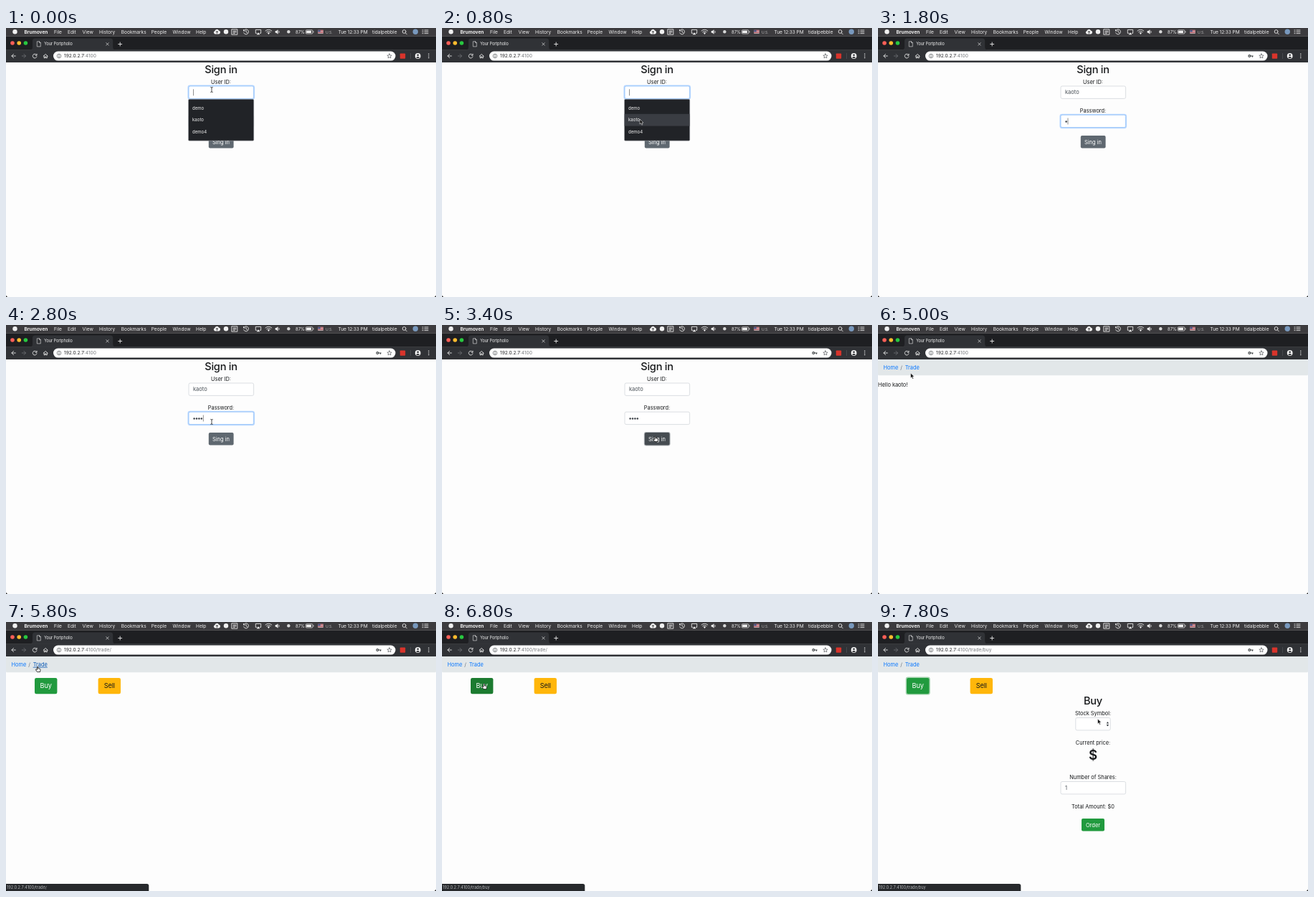
Write an HTML page that moves like this. It is 600x375 px and loops after 8000 ms.

```html
<!DOCTYPE html>
<html lang="en">
<head>
<meta charset="utf-8">
<title>Sign in and trade</title>
<style>
  html, body { margin: 0; width: 100%; height: 100%; overflow: hidden; background: #fdfdfd; }
  svg { display: block; width: 100%; height: 100%; }
  text { font-family: Inter, Roboto, sans-serif; white-space: pre; }
  .line { fill: none; stroke: #e8e8e8; stroke-width: .9; stroke-linecap: round; stroke-linejoin: round; }
</style>
</head>
<body>
<svg id="stage" viewBox="0 0 600 375"></svg>
<script>
const LOOP = 8000, STEP = 200;
const HOST = '192.0.2.7', PORT = ':4100', USER = 'kaoto';
const INK = '#17191b', BLUE = '#0a78ff', GREEN = '#219a3e', YELLOW = '#ffb60a', BORDER = '#cdd2d7';

const text = (x, y, size, str, fill = INK, extra = '') =>
  `<text x="${x}" y="${y}" font-size="${size}" fill="${fill}" ${extra}>${str}</text>`;
const mid = (y, size, str, fill, extra = '') =>
  text(300, y, size, str, fill, `text-anchor="middle" ${extra}`);
const rect = (x, y, w, h, r, fill, extra = '') =>
  `<rect x="${x}" y="${y}" width="${w}" height="${h}" rx="${r}" fill="${fill}" ${extra}/>`;
const dot = (x, y, r, fill, extra = '') => `<circle cx="${x}" cy="${y}" r="${r}" fill="${fill}" ${extra}/>`;
const line = (d, extra = '') => `<path class="line" d="${d}" ${extra}/>`;
const shape = (d, fill, extra = '') => `<path d="${d}" fill="${fill}" ${extra}/>`;
const group = (id, body) => `<g id="${id}">${body}</g>`;
const field = (x, y, w) => rect(x, y, w, 17.4, 2, '#fff', `stroke="${BORDER}" stroke-width=".7"`);
const focus = y => rect(254.3, y - .7, 92, 18.8, 2.5, 'none', 'stroke="#bcd9ff" stroke-width="1.7"')
  + rect(255, y, 90.6, 17.4, 2, '#fff', 'stroke="#80b8fb" stroke-width=".7"');
const caret = (x, y) => rect(x, y - 4.5, .6, 9, 0, '#444');
const heading = 'font-weight="500" letter-spacing="-.25"';

function menuBar() {
  const menus = [[67, 'File'], [86, 'Edit'], [106.6, 'View'], [130, 'History'],
    [160.7, 'Bookmarks'], [202.7, 'People'], [232.5, 'Window'], [265, 'Help']];
  const white = '#f0f0f0';
  return rect(0, 0, 600, 11.3, 0, '#3c3b3e')
    + dot(12.5, 5.3, 3.2, white)
    + text(25.5, 7.8, 6.6, 'Brumoven', white, 'font-weight="700"')
    + menus.map(([x, name]) => text(x, 7.8, 6.6, name, white)).join('')
    + shape('M291.5 8.4a2.2 2.2 0 0 1-.2-4.2 3 3 0 0 1 5.6-.7 2.5 2.5 0 0 1 .3 4.9z', white)
    + line('M294.4 7.3V4.4M293.1 5.6l1.3-1.3 1.3 1.3', 'style="stroke:#3c3b3e"')
    + dot(307, 5.3, 3.2, white)
    + line('M315.2 1.8h7.6v7.4h-7.6zM317 4h4M317 5.7h4M317 7.3h2.4')
    + line('M331.8 3.7a3.5 3.5 0 1 1-.1 3M331.5 2.4v1.7h1.7M335 3.4v2.2l1.5.8')
    + line('M349.7 7.3h-1.4V2.4h7.4v4.9h-1.4') + shape('M349.6 9.2l2.4-3 2.4 3z', white)
    + line('M362 4a6.2 6.2 0 0 1 8.8 0M363.6 5.8a4 4 0 0 1 5.6 0') + shape('M364.8 7a2.3 2.3 0 0 1 3.2 0l-1.6 1.9z', white)
    + shape('M375.7 4.1h1.6l2.1-1.9v6.5l-2.1-1.9h-1.6z', white) + line('M380.8 4.2q.9 1.3 0 2.6')
    + dot(394.3, 5.3, 2.2, '#d8d8d8')
    + text(404, 7.7, 6, '87%', white)
    + rect(418.3, 2.8, 9.6, 5.2, 1.1, 'none', `stroke="${white}" stroke-width=".7"`)
    + rect(419.2, 3.7, 6.7, 3.4, .3, white) + rect(428.5, 4.3, .9, 2.2, .4, white)
    + rect(435.3, 2.8, 7.4, 5, 0, '#d9c7c8')
    + [2.8, 4.5, 6.2].map(y => rect(435.3, y, 7.4, .8, 0, '#b54350')).join('')
    + rect(435.3, 2.8, 3.4, 2.6, 0, '#495486')
    + text(446, 7.6, 5.1, 'U.S.', '#b8b8b8')
    + text(463.6, 7.8, 6.6, 'Tue 12:33 PM', white, 'letter-spacing="-.1"')
    + text(511, 7.8, 6.6, 'tidalpebble', white)
    + line('M558 5a2.4 2.4 0 1 1-4.8 0 2.4 2.4 0 0 1 4.8 0M557.3 6.8l2 2')
    + dot(571.3, 5.3, 3.7, '#7898bd')
    + line('M581 3h1M584 3h5M581 5.3h1M584 5.3h5M581 7.6h1M584 7.6h5');
}

function browser() {
  const slate = 'style="stroke:#55585c"';
  return rect(0, 11.3, 600, 19.4, 0, '#1e1f22')
    + rect(0, 30.2, 600, 17.8, 0, '#303236')
    + shape('M33 30.5q4 0 4-4V18q0-3.6 3.6-3.6h105q3.6 0 3.6 3.6v8.5q0 4 4 4z', '#303236')
    + dot(9, 21, 2.8, '#fb5f57') + dot(18.2, 21, 2.8, '#fdbc2e') + dot(27.4, 21, 2.8, '#28c840')
    + line('M43.7 18.8h2.8l1.8 1.8v5.3h-4.6zM46.5 18.8v1.8h1.8', 'style="stroke-width:.6"')
    + text(53.2, 24.4, 5.6, 'Your Portpholio', '#f0f0f0', 'letter-spacing="-.08"')
    + line('M139.8 20.7l3.4 3.4M143.2 20.7l-3.4 3.4', 'style="stroke-width:.7"')
    + line('M156.7 22.5h5M159.2 20v5')
    + line('M13.3 39H8M10.5 36.4L7.9 39l2.6 2.6')
    + line('M22.3 39h5.2M25 36.4l2.6 2.6-2.6 2.6', 'style="stroke:#6a6c70"')
    + line('M42.4 37.2a2.9 2.9 0 1 0 .6 2.7M43 36.2v2h-2')
    + line('M52.2 39.2l3-2.7 3 2.7M53.1 38.8v3h1.4v-1.8h1.4v1.8h1.4v-3')
    + rect(66, 32.6, 477.5, 13, 6.5, '#fff')
    + dot(74, 39, 2.8, 'none', 'stroke="#5a5d60" stroke-width=".7"')
    + line('M74 38.8v1.7M74 37.4v.1', slate)
    + text(81, 41.3, 6.6, `${HOST}<tspan fill="#777a7e">${PORT}<tspan id="path"></tspan></tspan>`, '#202124')
    + group('key', dot(518.3, 39, 1.4, 'none', 'stroke="#3c4043" stroke-width="1.1"')
      + line('M520 39h3.3M522.4 39v1.2', 'style="stroke:#3c4043;stroke-width:1.1"'))
    + line('M535 35.9l.9 2.1 2.3.2-1.8 1.5.6 2.2-2-1.2-2 1.2.6-2.2-1.8-1.5 2.3-.2z', 'style="stroke:#55585c;stroke-width:.7"')
    + rect(549.8, 35.4, 7.4, 7.4, .8, '#d9342b')
    + rect(564.1, 35, .6, 8, 0, '#56595d')
    + dot(574.7, 39, 3.9, '#f1f1f1') + dot(574.7, 37.7, 1.3, '#303236')
    + shape('M572.2 41.3q2.5-2.6 5 0q-2.5 1.8-5 0z', '#303236')
    + [36.3, 38.9, 41.5].map(y => dot(589.8, y, .75, '#eee')).join('');
}

function signIn() {
  return mid(62.6, 14.6, 'Sign in', INK, heading)
    + mid(77.6, 7.4, 'User ID:')
    + field(255, 81, 90.6) + group('userFocus', focus(81) + caret(261.3, 89.8))
    + group('userName', text(261, 92.4, 7.5, USER, '#495057'))
    + mid(118, 7.4, 'Password:')
    + field(255, 121.2, 90.6) + group('passFocus', focus(121.2))
    + '<g id="bullets"></g><g id="passCaret">' + caret(0, 130) + '</g>'
    + group('signRing', rect(281.8, 149, 36.8, 19.6, 3, '#b3b7bb'))
    + rect(282.8, 150, 34.8, 17.6, 2, '#5f6870', 'id="signButton"')
    + mid(161.6, 7.5, 'Sing in', '#fff')
    + group('suggest', rect(254.4, 99.2, 91.4, 58, 1.5, '#212327', 'stroke="#b8bbc0" stroke-width=".5"')
      + rect(254.7, 0, 90.8, 16.8, 0, '#3a3d43', 'id="suggestRow"')
      + ['demo', USER, 'demo4'].map((name, i) => text(260, 113.5 + i * 16.8, 6.1, name, '#f4f4f4')).join(''));
}

function site() {
  return rect(0, 48, 600, 22.3, 1.5, '#e2e7e9')
    + text(7.5, 61.8, 7.4, 'Home', BLUE)
    + text(31.2, 61.8, 7.4, '/', '#6c757d')
    + text(37.7, 61.8, 7.4, 'Trade', BLUE, 'id="tradeLink"')
    + group('hello', text(0, 86.3, 7.4, `Hello ${USER}!`))
    + group('trade', group('buyRing', rect(38.6, 76.6, 34.2, 25, 3.4, '#a3d3ae'))
      + rect(40, 78, 31.4, 22.2, 2.3, GREEN, 'id="buyButton"')
      + text(55.7, 92.4, 9.2, 'Buy', '#fff', 'text-anchor="middle" letter-spacing="-.15"')
      + rect(128.6, 78, 31.4, 22.2, 2.3, YELLOW)
      + text(144.3, 92.4, 9.2, 'Sell', INK, 'text-anchor="middle" letter-spacing="-.15"'))
    + group('buyForm', mid(115.1, 14.6, 'Buy', INK, heading)
      + mid(130.2, 7.4, 'Stock Symbol:')
      + field(275.8, 133.5, 48.4)
      + shape('M318.7 141.5h3.4l-1.7-2.4zM318.7 143h3.4l-1.7 2.4z', '#343a40')
      + mid(170.6, 7.4, 'Current price:')
      + mid(191.8, 18.7, '$', INK, 'font-weight="600"')
      + mid(219, 7.4, 'Number of Shares:')
      + field(255, 222.5, 90.6) + text(261, 234, 7.5, '1', '#495057')
      + mid(259.6, 7.4, 'Total Amount: $0')
      + rect(284, 274, 32, 17.6, 2, GREEN) + mid(285.5, 7.5, 'Order', '#fff'));
}

const statusBar = () => shape('M0 365h196.5q2.8 0 2.8 2.8V375H0z', '#27292c')
  + text(1, 372.2, 5.6, `${HOST}${PORT}<tspan id="target"></tspan>`, '#b4b6b9');

// Pointers are drawn around their hot spot.
const pointers = {
  arrow: shape('M0 0v7l1.6-1.4 1.2 2.6 1.2-.6-1.2-2.5H5z', '#111', 'stroke="#fff" stroke-width=".5"'),
  beam: line('M-1.3-3.6q1.3 0 1.3 1v5.2q0 1 1.3 1M1.3-3.6Q0-3.6 0-2.6M-1.3 3.6Q0 3.6 0 2.6', 'style="stroke:#222;stroke-width:.8"'),
  hand: shape('M-1-3.4q.7-.7 1.3 0v2.2l2.6.5q.7.3.6 1.1l-.5 3.2h-4l-2.1-3q0-1.1 1-.7l1.1.8z', '#fff', 'stroke="#111" stroke-width=".8" stroke-linejoin="round"')
};

// Each entry changes part of the state from its time onward.
const timeline = [
  [0, { page: 'sign', active: 'user', suggest: true, row: -1, filled: false, typed: 0, key: false,
        press: '', path: '', target: '', pointer: 'beam', x: 287, y: 86 }],
  [200, { x: 285, y: 91 }],
  [400, { pointer: 'arrow', x: 281, y: 108, row: 0 }],
  [600, { x: 277, y: 124, row: 1 }],
  [800, { x: 276, y: 127 }],
  [1000, { suggest: false, filled: true, active: '' }],
  [1200, { x: 279, y: 128 }],
  [1400, { pointer: 'beam', x: 285, y: 130 }],
  [1600, { active: 'pass' }],
  [1800, { typed: 1, key: true, pointer: '' }],
  [2000, { typed: 2 }],
  [2200, { typed: 3 }],
  [2400, { typed: 4 }],
  [2800, { pointer: 'beam', x: 287, y: 135 }],
  [3000, { pointer: 'arrow', x: 295, y: 148 }],
  [3200, { pointer: 'hand', x: 298, y: 159, press: 'signHover' }],
  [3400, { active: '', press: 'sign' }],
  [3600, { page: 'hello', press: '', pointer: 'arrow', x: 298, y: 155 }],
  [4000, { x: 284, y: 149 }],
  [4200, { x: 220, y: 118 }],
  [4400, { x: 132, y: 88 }],
  [4600, { x: 72, y: 74 }],
  [4800, { x: 49, y: 68 }],
  [5000, { x: 45.5, y: 67 }],
  [5200, { pointer: 'hand', x: 44.5, y: 66, target: '/trade/' }],
  [5800, { page: 'trade', path: '/trade/' }],
  [6200, { x: 45, y: 67 }],
  [6400, { pointer: 'arrow', x: 50, y: 74 }],
  [6600, { pointer: 'hand', x: 57, y: 86, press: 'buyHover', target: '/trade/buy' }],
  [6800, { x: 59, y: 90 }],
  [7000, { press: 'buy' }],
  [7200, { page: 'buy', path: '/trade/buy' }],
  [7600, { pointer: 'arrow', x: 170, y: 118, press: 'buyFocus' }],
  [7800, { x: 306.5, y: 135 }]
];

const stage = document.getElementById('stage');
stage.innerHTML = rect(0, 0, 600, 375, 0, '#fdfdfd')
  + group('signPage', signIn()) + group('site', site()) + menuBar() + browser()
  + group('status', statusBar())
  + shape('M0 373v2h2q-2 0-2-2zM600 373v2h-2q2 0 2-2z', '#111', 'stroke="#111" stroke-width=".5"')
  + group('pointer', Object.entries(pointers).map(([id, body]) => group(id, body)).join(''));

const $ = id => document.getElementById(id);
const show = (id, on) => { $(id).style.display = on ? '' : 'none'; };
const paint = (id, fill) => $(id).setAttribute('fill', fill);

function render(time) {
  const s = Object.assign({}, ...timeline.filter(([at]) => at <= time).map(([, change]) => change));
  const buying = s.page === 'buy';
  show('signPage', s.page === 'sign');
  show('site', s.page !== 'sign');
  show('hello', s.page === 'hello');
  show('trade', s.page === 'trade' || buying);
  show('buyForm', buying);
  show('key', s.key);

  show('userFocus', s.active === 'user');
  show('userName', s.filled);
  show('passFocus', s.active === 'pass');
  show('passCaret', s.active === 'pass');
  $('passCaret').setAttribute('transform', `translate(${261.3 + s.typed * 3.4})`);
  $('bullets').innerHTML = Array.from({ length: s.typed }, (_, i) => dot(262.6 + i * 3.4, 130.4, 1.25, '#3d4248')).join('');
  show('suggest', s.suggest);
  show('suggestRow', s.row >= 0);
  $('suggestRow').setAttribute('y', 103 + s.row * 16.8);

  show('signRing', s.press === 'sign');
  paint('signButton', { sign: '#464c51', signHover: '#50575d' }[s.press] || '#5f6870');
  show('buyRing', s.press === 'buy' || s.press === 'buyFocus');
  paint('buyButton', { buy: '#1a762d', buyHover: '#1c7b30' }[s.press] || GREEN);

  const onTrade = s.pointer === 'hand' && s.target === '/trade/';
  $('tradeLink').style.textDecoration = onTrade ? 'underline' : 'none';
  paint('tradeLink', onTrade ? '#0556b3' : BLUE);
  $('path').textContent = s.path;
  $('target').textContent = s.target;
  show('status', s.target);

  Object.keys(pointers).forEach(id => show(id, s.pointer === id));
  $('pointer').setAttribute('transform', `translate(${s.x} ${s.y})`);
}

const start = performance.now();
let shown = -1;
function tick() {
  const time = Math.floor((performance.now() - start) % LOOP / STEP) * STEP;
  if (time !== shown) render(shown = time);
  requestAnimationFrame(tick);
}
tick();
</script>
</body>
</html>
```
